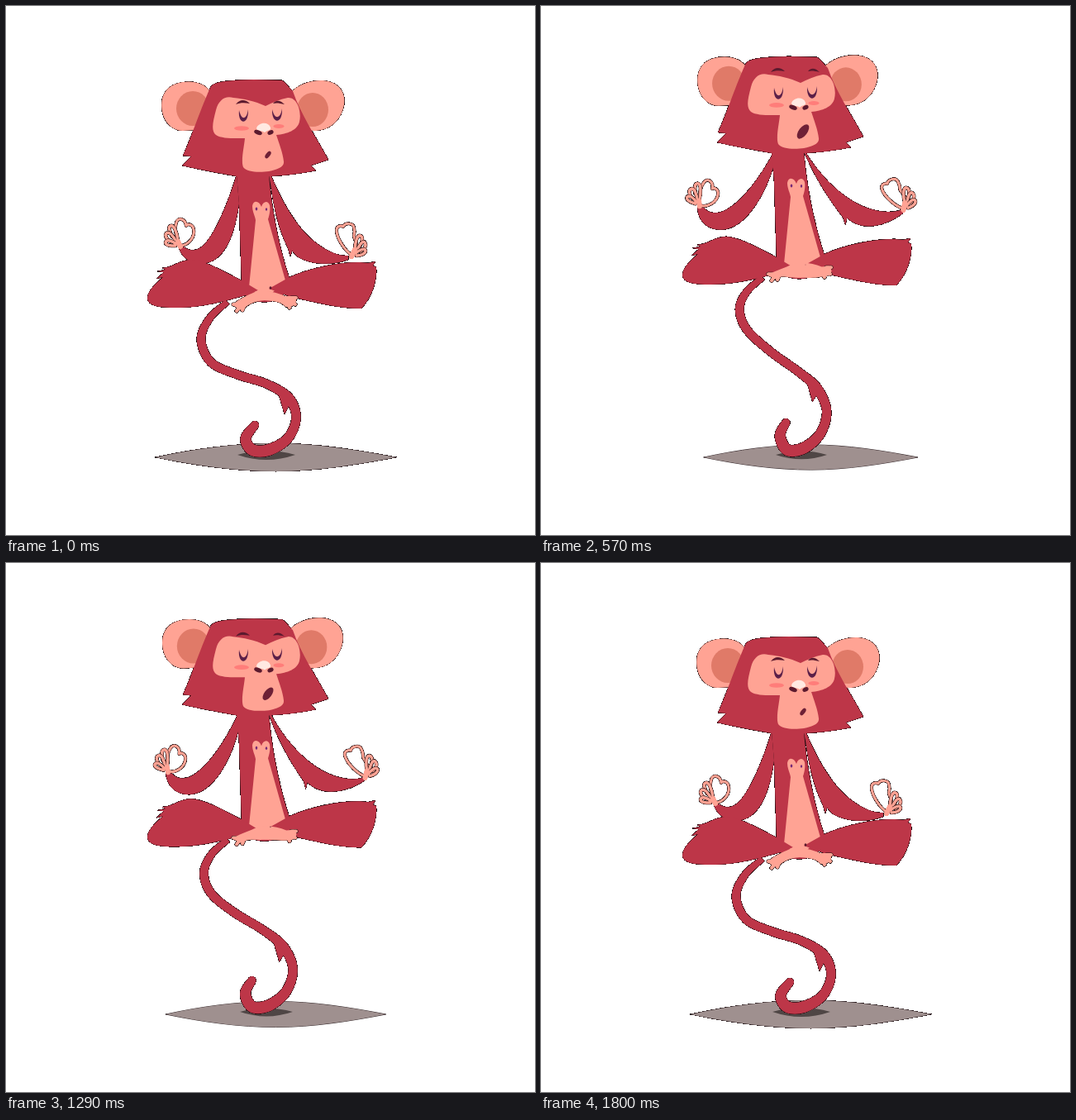
Animation of 640x640 px, one loop 1830 ms. Source, as an HTML page:

```html
<!DOCTYPE html>
<html lang="en">
<head>
<meta charset="utf-8">
<title>Levitating monkey</title>
<style>
  html, body { margin: 0; width: 100%; height: 100%; overflow: hidden; background: #fff; }
  svg { display: block; width: 100%; height: 100%; }
</style>
</head>
<body>
<svg id="stage" viewBox="0 0 640 640" fill="none" stroke-linecap="round" stroke-linejoin="round"></svg>
<script>
const LOOP = 1830, STEP = 30, RISE = 39;
const FUR = '#bd3648', SKIN = '#ffa394', EAR = '#e07a68', DARK = '#5b1a2e', EDGE = '#190b0e';

// Height of the float over time: 0 is lowest, 1 is highest.
const beats = [[0, 0], [240, .256], [570, .72], [870, 1], [1050, .885],
  [1290, .56], [1560, .186], [1800, 0], [LOOP, 0]];

function slope(i) {
  const a = beats[i - 1], b = beats[i], c = beats[i + 1];
  if (!a || !c || (b[1] - a[1]) * (c[1] - b[1]) <= 0) return 0;
  return (c[1] - a[1]) / (c[0] - a[0]);
}

function lift(t) {
  let i = 0;
  while (i < beats.length - 2 && t >= beats[i + 1][0]) i++;
  const [t0, p0] = beats[i], [t1, p1] = beats[i + 1];
  const d = t1 - t0, s = (t - t0) / d, r = 1 - s;
  return p0 * (1 + 2 * s) * r * r + p1 * s * s * (3 - 2 * s)
    + d * s * r * (slope(i) * r - slope(i + 1) * s);
}

// Blends paths that share one command structure.
const NUMBER = /-?\d+(\.\d+)?/g;
const numbers = text => text.match(NUMBER).map(Number);

function blend(poses, p) {
  const knots = poses.length === 3 ? [0, .256, .885] : [0, .885];
  const i = poses.length === 3 && p > knots[1] ? 1 : 0;
  const k = (p - knots[i]) / (knots[i + 1] - knots[i]);
  const a = numbers(poses[i]), b = numbers(poses[i + 1]);
  let n = 0;
  return poses[i].replace(NUMBER, () => (a[n] + (b[n] - a[n++]) * k).toFixed(2));
}

const tailPoses = [
  '268,358 247,377 236,403 248,431 280,446 315,457 342,474 351,498 341,523 318,537 298,537 290,523 301,507',
  '269,347 249,364 238,391 247,416 275,433 310,447 338,467 350,493 341,520 319,536 298,537 290,522 300,507',
  '268,322 249,339 241,358 250,383 279,413 311,440 332,460 344,488 337,516 318,534 298,537 289,519 295,503'];
const tailWidths = [7, 9, 10.5, 10.5, 10.5, 10.5, 12, 11, 12, 14, 14, 13, 10];
const tuftPoses = [
  'M328,464L337,494L344,480Z',
  'M326,460L335,490L342,478Z',
  'M319,449L326,475L333,464Z'];
const leftArm = [
  'M279,204C268,240 250,284 234,293C226,298 217,294 213,289L209,292C211,301 219,309 230,311C262,316 276,282 282,239Z',
  'M279,195C266,228 249,264 228,277C218,283 209,278 206,272L201,274C203,287 212,298 229,298C256,298 277,254 282,213Z',
  'M282,171C266,198 242,226 222,236C208,243 196,240 191,229L185,230C184,247 193,260 212,261C245,262 272,216 284,177Z'];
const rightArm = [
  'M318,205L321,206C334,236 350,266 372,284C388,297 403,303 414,302L414,307C396,314 370,314 352,303L346,296L344,303L341,293C330,270 325,250 320,215Z',
  'M318,195L322,196C333,222 351,249 371,266C389,281 411,288 427,284L424,289C404,298 373,301 357,286L354,283L352,290L350,279C336,255 324,225 320,204Z',
  'M318,170L320,171C334,190 354,212 379,225C400,236 423,240 440,233L443,237C423,255 398,262 380,250L376,247L374,256L371,248C352,226 335,202 321,175Z'];
const leftWrist = ['211,290', '204,273', '188,230'];
const rightWrist = ['416,304', '425,286', '441,235'];
const feetPoses = [
  'M305,344C318,345 326,346 338,351L348,351C353,354 352,362 344,364L338,364C334,359 328,357 313,356C300,357 294,361 289,365C284,369 278,368 279,365C274,363 275,360 277,359C285,352 296,349 305,344Z',
  'M305,339C318,335 330,338 340,342L348,341C353,344 353,351 346,353L338,354C332,357 324,357 313,357C300,357 295,353 289,354C286,357 278,357 279,354C274,353 275,352 276,351C284,347 296,344 305,339Z'];

const shape = (d, fill) => `<path d="${d}" fill="${fill}"/>`;
const oval = (x, y, rx, ry, fill, turn = 0) =>
  `<ellipse cx="${x}" cy="${y}" rx="${rx}" ry="${ry}" fill="${fill}" transform="rotate(${turn} ${x} ${y})"/>`;
const group = (transform, body) => `<g transform="${transform}">${body}</g>`;
const limb = (d, w) => [[EDGE, w + 1], [SKIN, w]]
  .map(([color, width]) => `<path d="${d}" stroke="${color}" stroke-width="${width}"/>`).join('');
const limbs = (paths, w) => paths.map(d => limb(d, w)).join('');

// Outline of varying width around a Catmull-Rom curve.
function ribbon(points, widths) {
  const left = [], right = [], at = i => points[Math.max(0, Math.min(points.length - 1, i))];
  for (let i = 0; i < points.length - 1; i++) {
    const [a, b, c, d] = [at(i - 1), at(i), at(i + 1), at(i + 2)];
    for (let s = 0; s <= 1; s += .125) {
      const pos = j => b[j] + s / 2 * (c[j] - a[j] + s * (2 * a[j] - 5 * b[j] + 4 * c[j] - d[j]
        + s * (3 * (b[j] - c[j]) + d[j] - a[j])));
      const vel = j => c[j] - a[j] + 2 * s * (2 * a[j] - 5 * b[j] + 4 * c[j] - d[j])
        + 3 * s * s * (3 * (b[j] - c[j]) + d[j] - a[j]);
      const vx = vel(0), vy = vel(1);
      const half = (widths[i] + (widths[i + 1] - widths[i]) * s) / 2 / (Math.hypot(vx, vy) || 1);
      left.push([(pos(0) - vy * half).toFixed(2), (pos(1) + vx * half).toFixed(2)]);
      right.unshift([(pos(0) + vy * half).toFixed(2), (pos(1) - vx * half).toFixed(2)]);
    }
  }
  return 'M' + [...left, ...right].join('L') + 'Z';
}

function tail(p) {
  const flat = numbers(blend(tailPoses, p));
  const points = tailWidths.map((_, i) => [flat[2 * i], flat[2 * i + 1]]);
  const tip = points[points.length - 1];
  return shape(ribbon(points, tailWidths), FUR) + oval(tip[0], tip[1], 5, 5, FUR)
    + shape(blend(tuftPoses, p), FUR);
}

function ground(p) {
  const size = 1 - .158 * p;
  const mat = shape('M-146,0C-100,-10 -52,-17 0,-17C50,-17 98,-9 146,0C98,9 50,17 0,17C-48,17 -98,10 -146,0Z', '#9f908f');
  const place = `translate(326.5 546) scale(${size})`;
  return group(place, `<g stroke="${EDGE}" stroke-width="1" shape-rendering="crispEdges">${mat}</g>` + mat)
    + group(`translate(315 543) scale(${size})`, shape('M-35,0Q0,-10 35,0Q0,12 -35,0Z', '#4f4645'));
}

function hands(p) {
  const left = limb('M-1,0C10,0 18,-11 16,-20C15,-26 9,-27 7,-24C6,-33 -3,-35 -5,-28C-7,-22 -6,-14 -3,-6', 3)
    + limbs(['M-3,-6C-4,-16 -8,-26 -12,-24C-16,-22 -12,-16 -10,-11',
      'M-5,-4C-8,-12 -14,-18 -17,-15C-20,-12 -15,-6 -11,-5',
      'M-5,-2C-10,-6 -17,-8 -18,-4C-18,0 -11,0 -6,0'], 3.4)
    + `<path d="M0,1L-3,-5" stroke="${SKIN}" stroke-width="6"/>`;
  const right = limb('M2,-3C-6,-8 -15,-22 -16,-31C-17,-38 -11,-39 -8,-37C-6,-42 4,-42 5,-36C6,-32 6,-30 5,-27C4,-24 8,-20 8,-15', 3)
    + limbs(['M6,-8C6,-18 9,-28 13,-26C17,-24 14,-17 12,-13',
      'M8,-7C11,-15 16,-21 18,-18C21,-14 17,-9 13,-7',
      'M7,-5C12,-9 18,-12 19,-8C19,-4 13,-2 8,-2'], 3.4)
    + `<path d="M2,-1L6,-9" stroke="${SKIN}" stroke-width="6"/>`;
  return group(`translate(${blend(leftWrist, p)}) rotate(${28 * p})`, left)
    + group(`translate(${blend(rightWrist, p)}) rotate(${-22 * p})`, right);
}

function trunk(p) {
  const toes = limbs(['M280,361L275,361', 'M284,362L279,369', 'M289,361L286,368'], 4)
    + limbs(['M345,353L351,353', 'M344,357L350,361', 'M340,358L343,365'], 4);
  return shape('M279,204L282,240L285,334L290,350C300,361 325,361 335,350L343,330C330,290 322,250 318,205Z', FUR)
    + shape('M309,243C306,235 299,235 298,242C298,249 301,253 302,259L294,340L303,347L322,347L338,332L317,258C319,252 320,246 319,241C317,235 311,236 309,243Z', SKIN)
    + oval(303, 245.5, 1.3, 2, '#7a2c78') + oval(315, 246, 1.2, 1.8, '#7a2c78')
    + shape('M305,344L285,332C258,318 240,308 224,307C212,307 204,314 195,316L189,317L193,319L183,321L191,322L182,330L190,328C178,338 171,346 171,354C172,363 186,365 205,365C235,365 262,358 290,350Z', FUR)
    + shape('M318,342L343,328C368,317 400,310 428,310L438,311L447,309L444,314L448,316C449,333 443,352 430,366C402,366 372,358 345,352Z', FUR)
    + group(`translate(0 ${-12 * p})`, toes)
    + shape(blend(feetPoses, p), SKIN)
    + oval(320, 341, 1.4 * (1 - p), 1.7 * (1 - p), DARK);
}

function head(p) {
  const shift = (dx, dy, body) => group(`translate(${dx * p} ${dy * p})`, body);
  const ears = shift(1.5, -3, shape('M246,102C238,92 222,89 206,94C191,99 186,113 189,128C192,143 203,151 214,151L230,150Z', SKIN)
      + oval(226, 124, 20, 21, EAR))
    + shift(-3, -3.6, shape('M346,103C358,92 378,87 393,92C408,97 412,111 408,124C403,141 390,151 372,151L360,150Z', SKIN)
      + oval(371, 125.5, 19, 20.5, EAR));
  const brows = shape('M278,119C283,112 290,113 295,118C288,116.5 283,117 278,119Z', DARK)
    + shape('M323,118C327,113 332,114 337,119C331,117.5 327,117 323,118Z', DARK);
  const eyes = shape('M282,126C280,144 294,145 293,125C291,138 285,139 282,126Z', '#5b1f48')
    + shape('M322,125C321,143 335,144 334,124C332,137 325,138 322,125Z', '#5b1f48');
  const nose = shape('M303,148C305,141 317,139 320,147C321,151 316,150 313,153C309,150 304,152 303,148Z', '#ffe9e2')
    + oval(305, 153, 5, 2.6, DARK, 20) + oval(320, 153, 3.8, 2.6, DARK, -28);
  return ears
    + shape('M247,99C250,92 262,90 300,89L334,90C338,92 341,97 347,103C356,130 376,160 390,186L369,193L375,199C355,203 338,205 321,206L279,206C255,202 235,198 213,193L224,182L214,181C222,165 234,128 247,99Z', FUR)
    + shape('M275,111C265,108 257,114 254,126C250,141 248,151 254,156C261,161 279,160 289,160C288,171 284,187 287,195C292,202 309,201 318,200C328,198 337,195 336,188C335,178 330,165 327,156C340,155 353,150 355,140C358,127 352,110 341,111C331,113 322,117 314,121C301,115 287,112 275,111Z', SKIN)
    + oval(285, 148, 9, 2.8, '#ff7d7a') + oval(330, 145.5, 6.5, 2.5, '#ff7d7a')
    + shift(0, -3, nose) + shift(0, 1.5, eyes) + shift(0, -15, brows)
    + oval(317, 180, 2.5 + 3.6 * p, 5 + 7.2 * p, '#6e2036', 37);
}

function scene(p) {
  const float = `translate(0 ${-RISE * p})`;
  const figure = tail(p) + shape(blend(leftArm, p), FUR) + shape(blend(rightArm, p), FUR)
    + group(float, trunk(p)) + hands(p) + group(float, head(p));
  // The first copy leaves a fine, hard-edged dark rim around the silhouette.
  return ground(p) + `<g stroke="${EDGE}" stroke-width="1" shape-rendering="crispEdges">${figure}</g>` + figure;
}

const stage = document.getElementById('stage');
let shown = -1;

function draw(now) {
  const t = Math.floor(now % LOOP / STEP) * STEP;
  if (t !== shown) {
    stage.innerHTML = scene(lift(t));
    shown = t;
  }
}

const start = performance.now();
function tick() {
  draw(performance.now() - start);
  requestAnimationFrame(tick);
}
tick();
</script>
</body>
</html>
```
